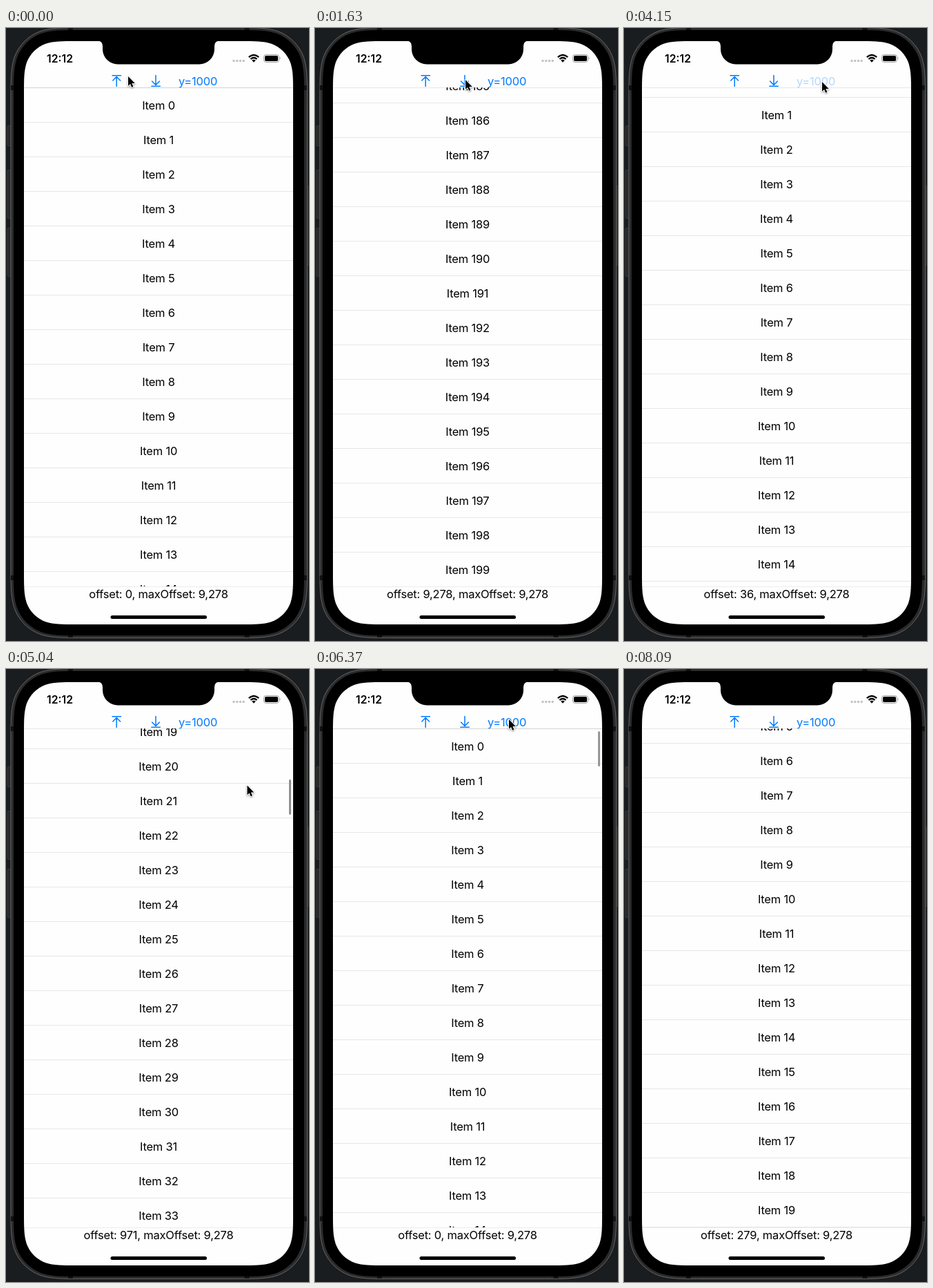
These frames come from a looping animation (439x887 px, 8190 ms). An HTML page:

```html
<!DOCTYPE html>
<html lang="en">
<head>
<meta charset="utf-8">
<title>Scroll offset demo</title>
<style>
  html, body { margin: 0; width: 100%; height: 100%; overflow: hidden; background: #191d20; }
  svg { display: block; }
  text { font: 16.5px Inter, "Liberation Sans", sans-serif; letter-spacing: -.22px; text-anchor: middle; }
  .clock { font-size: 15.8px; font-weight: 600; letter-spacing: 0; }
  .icon { fill: none; stroke: #007aff; stroke-width: 1.5; stroke-linecap: round; stroke-linejoin: round; }
  #cursor { stroke: #fff; stroke-width: 2; paint-order: stroke; stroke-linejoin: round; filter: drop-shadow(0 1px 1px #0006); }
</style>
</head>
<body>
<svg width="439" height="887" viewBox="0 0 439 887">
  <clipPath id="list"><rect x="26" y="86" width="390" height="722"/></clipPath>

  <!-- phone body and side buttons -->
  <g fill="#292929" stroke="#444" stroke-width=".6">
    <rect x="2" y="141.500" width="6" height="29" rx="1"/>
    <rect x="2" y="205.500" width="6" height="70" rx="1"/>
    <rect x="2" y="289.500" width="6" height="70" rx="1"/>
    <rect x="434" y="228.500" width="5" height="115" rx="1"/>
  </g>
  <path id="body" fill="#2b2b2b" stroke="#666"/>
  <path d="M7 86.500h5M431 86.500h5M7 795.500h5M431 795.500h5M93.500 0v4M349 0v4M93.500 878v4M349 878v4" stroke="#111" stroke-width="7"/>
  <path id="bezel"/>
  <path id="screen" fill="#fefefe"/>
  <path d="M133 18.500q7 .5 7 8v4a22 22 0 0 0 22 22h118a22 22 0 0 0 22-22v-4q0-7.500 7-8z"/>

  <!-- status bar -->
  <text class="clock" x="78" y="49.500">12:12</text>
  <path d="M330 47.500h15" stroke="#c4c4c6" stroke-width="3.600" stroke-linecap="round" stroke-dasharray="0 4.750"/>
  <path d="M351.800 42.200q7.200-6.400 14.400 0M354.400 45q4.600-4 9.200 0" fill="none" stroke="#000" stroke-width="2.300"/>
  <path d="M356.200 46.800q2.800-2.200 5.600 0l-2.800 2.900z"/>
  <rect x="373.500" y="38.500" width="22" height="11" rx="3.300" fill="none" stroke="#a0a0a2"/>
  <rect x="375" y="40" width="19" height="8" rx="1.800"/>
  <path d="M396.800 42q2 1.700 0 3.600z" fill="#a0a0a2"/>

  <!-- scrolling list -->
  <g id="rows" clip-path="url(#list)"></g>
  <path d="M26 86.500h390" stroke="#000" stroke-opacity=".09"/>
  <path d="M26 808.500h390" stroke="#000" stroke-opacity=".07"/>
  <rect id="bar" x="410" width="3" height="51" rx="1.500" fill="#8e8e90"/>

  <!-- toolbar -->
  <path id="up" class="icon" d="M154 68.700h12.500M160.200 84.500V70.500M154.800 76l5.400-5.500 5.400 5.500"/>
  <path id="down" class="icon" d="M210.800 84.300h12.500M217 68.500v14M211.600 77l5.400 5.500 5.400-5.500"/>
  <text id="jump" x="278" y="82.500" fill="#007aff">y=1000</text>

  <text id="label" x="221" y="825"></text>
  <rect x="151.500" y="850" width="139.500" height="5" rx="2.500"/>
  <path id="cursor" d="M0 0v13.800l3.100-2.900 2 4.800 2.300-1-2-4.600h4.400z"/>
</svg>
<script>
const LOOP = 8190, STEP = 148.15, ROW = 50, TOP = 86, MAX = 9278;
const $ = id => document.getElementById(id);
const clamp = v => Math.max(0, Math.min(1, v));

// Scrolls started by a button, or by swiping when there is none.
const scrolls = [
  { at: 1147.5, ms: 300, to: [MAX], button: "down" },
  { at: 2700.9, ms: 300, to: [0], button: "up" },
  { at: 4114, ms: 300, to: [1000], button: "jump" },
  { at: 5000, ms: 300, to: [300] },
  { at: 5522.7, ms: 130, to: [0] },
  { at: 6770, ms: 200, to: [279], button: "jump" }
];
const BAR_SHOWN = 5000, BAR_GONE = 6650;

const pointerStart = [177, 70];
const pointerMoves = [
  { at: 0, ms: 590, to: [218, 75] },
  { at: 1930, ms: 440, to: [143.5, 79.5] },
  { at: 2960, ms: 590, to: [287, 78] },
  { at: 4450, ms: 290, to: [349.5, 168.5] },
  { at: 5780, ms: 580, to: [281, 73] },
  { at: 6815, ms: 740, to: [420, 900] }
];

// Runs the eased moves one after another and gives the value at time t.
function follow(moves, from, t) {
  return moves.reduce((value, { at, ms, to }) => {
    const u = clamp((t - at) / ms);
    const ease = u * u * (3 - 2 * u);
    return value.map((v, i) => v + (to[i] - v) * ease);
  }, from);
}

// A pressed button dims at once, then brightens again.
function buttonOpacity(id, t) {
  const press = scrolls.findLast(s => s.button === id && s.at <= t);
  return press ? clamp(.2 + (t - press.at) / 400) : 1;
}

// Rounded rectangle with continuous corners: each edge eases into its curve.
function smoothRect(x, y, w, h, r) {
  const corner = [[1.528, 0], [1.088, 0], [.868, 0], [.631, .075], [.372, .169], [.169, .372],
    [.075, .631], [0, .868], [0, 1.088], [0, 1.528]];
  const points = (right, bottom) => corner.map(([a, b]) =>
    `${right ? x + w - a * r : x + a * r} ${bottom ? y + h - b * r : y + b * r}`);
  const curve = ([first, ...rest]) => `L${first}C${rest}`;
  const path = curve(points(0, 0)) + curve(points(0, 1).reverse()) +
    curve(points(1, 1)) + curve(points(1, 0).reverse());
  return "M" + path.slice(1) + "z";
}
$("body").setAttribute("d", smoothRect(7, -.5, 429.5, 883, 68));
$("bezel").setAttribute("d", smoothRect(11, 3, 421, 876, 64));
$("screen").setAttribute("d", smoothRect(26, 19, 390, 844, 50));

const rows = Array.from({ length: 16 }, () => {
  const g = document.createElementNS("http://www.w3.org/2000/svg", "g");
  g.innerHTML = '<path d="M26 .5h390" stroke="#000" stroke-opacity=".09"/><text x="221" y="32"></text>';
  return $("rows").appendChild(g);
});

const grouped = n => n.toLocaleString("en-US");

function draw(time) {
  // The picture advances in even steps.
  const t = Math.floor(time % LOOP / STEP + .05) * STEP;
  const offset = Math.round(follow(scrolls, [0], t)[0]);
  const first = Math.floor(offset / ROW);
  rows.forEach((row, i) => {
    row.setAttribute("transform", `translate(0 ${TOP + (first + i) * ROW - offset})`);
    row.lastChild.textContent = `Item ${first + i}`;
  });
  $("label").textContent = `offset: ${grouped(offset)}, maxOffset: ${grouped(MAX)}`;
  for (const id of ["up", "down", "jump"]) $(id).setAttribute("opacity", buttonOpacity(id, t));
  $("bar").setAttribute("opacity", t < BAR_SHOWN ? 0 : clamp((BAR_GONE - t) / 300));
  $("bar").setAttribute("y", 90 + offset / MAX * 667);
  $("cursor").setAttribute("transform", `translate(${follow(pointerMoves, pointerStart, t)})`);
}

const start = performance.now();
function tick() {
  draw(performance.now() - start);
  requestAnimationFrame(tick);
}
tick();
</script>
</body>
</html>
```
